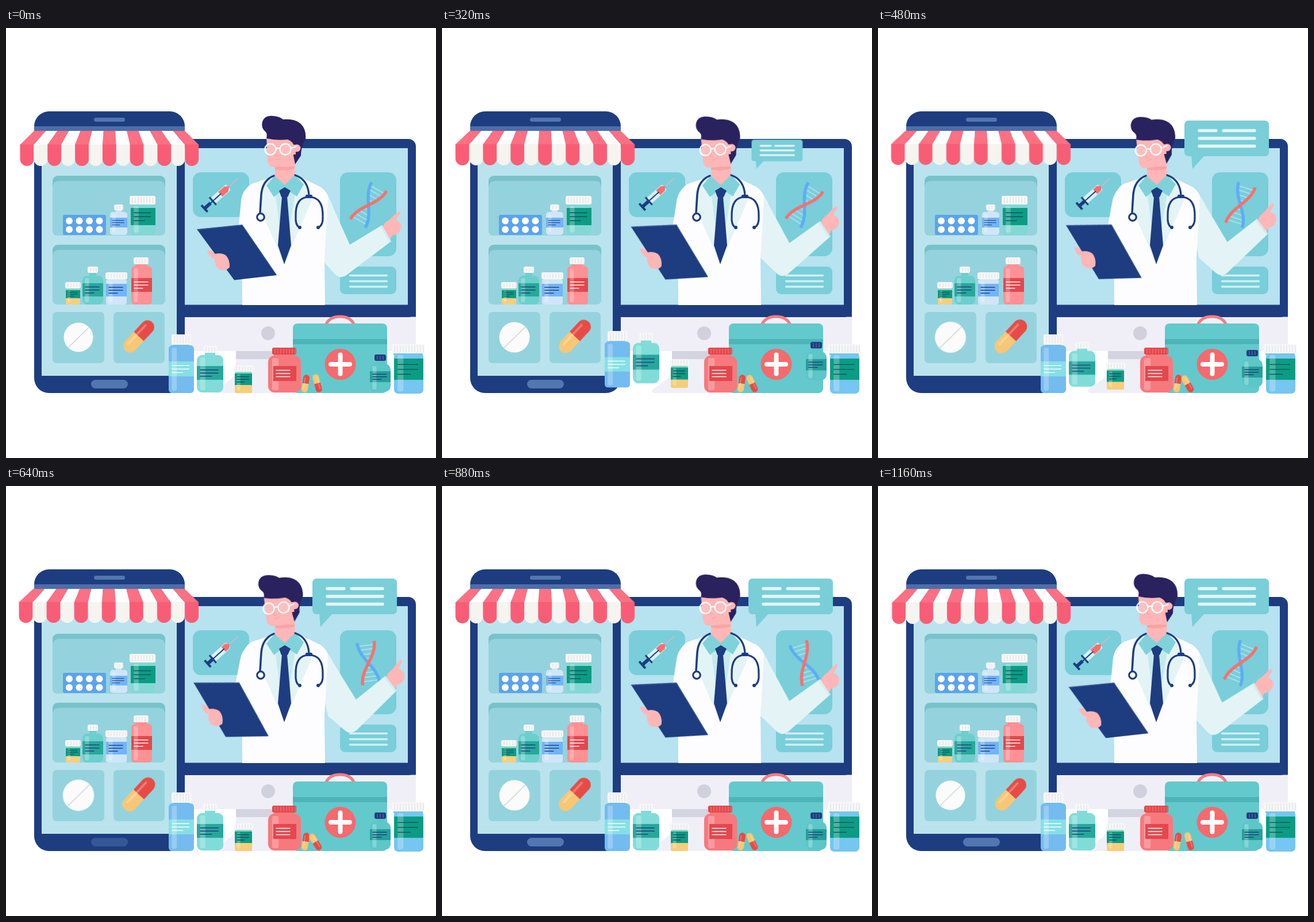
These frames come from a looping animation (748 px wide and 748 px high, 1.2 s). An HTML page:

```html
<!DOCTYPE html>
<html lang="en">
<head>
<meta charset="utf-8">
<title>Online pharmacy</title>
<style>
html,body{margin:0;width:100%;height:100%;overflow:hidden;background:#fff}
svg{display:block;width:100vw;height:100vh}
.sway{animation:sway 1.2s infinite cubic-bezier(.35,.25,.65,.75)}
@keyframes sway{50%{transform:var(--to)}}
.head{--to:rotate(-4.6deg);transform-origin:488px 252px}
.left{--to:rotate(6deg);transform-origin:410px 288px}
.right{--to:rotate(-8deg);transform-origin:562px 292px}
.tablet{--to:scale(1.07);transform-origin:126px 538px}
.capsule{--to:scale(1.06);transform-origin:231px 536px}
.lean{--to:rotate(-18deg);transform-origin:544px 630px}
.awning{--to:translateX(-.2px) scale(1.006,.966);transform-origin:335px 179px}
.plunger{--to:translateX(8px)}
.fluid{--to:scaleX(.62);transform-origin:22px 0}
.bubble{transform-origin:547px 245px;animation:pop 1.2s infinite linear}
@keyframes pop{0%,16.7%{transform:scale(0)}26.67%{transform:scale(.6)}36%,100%{transform:scale(1)}}
.dna{transform-origin:630.5px 308px;animation:rock 1.2s infinite linear}
@keyframes rock{
0%,100%{transform:rotate(30deg)}13%{transform:rotate(31deg)}27%{transform:rotate(32deg)}
40%{transform:rotate(18deg)}53%{transform:rotate(-7deg)}60%{transform:rotate(-16deg)}
67%{transform:rotate(-21deg)}73%{transform:rotate(-18deg)}85%{transform:rotate(3deg)}97%{transform:rotate(23deg)}}
.home{animation:blink 1.2s infinite linear}
@keyframes blink{0%,28%,64%,100%{opacity:1}39%,44%{opacity:0}}
.hop{transform-origin:0 635px;animation:hop 1.2s infinite linear}
@keyframes hop{0%,2%,37%,100%{transform:none}13.33%{transform:var(--up)}26.67%{transform:var(--down)}}
.b1{--up:translateY(-19px) scaleY(1.045);--down:translateY(-9.5px) scaleY(.965)}
.b2{--up:translateY(-16px) scaleY(1.08);--down:translateY(-10px) scaleY(.96);animation-delay:160ms}
.b3{--up:translateY(-9px) scaleY(1.04);--down:translateY(-6px) scaleY(.97);animation-delay:160ms}
.b4{--up:translateY(-20px) scaleY(1.03);--down:translateY(-8px);animation-delay:160ms}
.b5{--up:scaleY(.953);--down:none}
</style>
</head>
<body>
<svg id="stage" viewBox="0 0 748 748"></svg>
<script>
const NAVY = '#1e3c80', SKIN = '#ffb6b6', PANEL = '#79ced9', SHELF = '#94d3dd',
  GREEN = '#0b9c83', WHITE = '#f7f7f8', RED = '#e5474d';

const rect = (x, y, w, h, fill, r = 0) =>
  `<rect x="${x}" y="${y}" width="${w}" height="${h}" rx="${r}" fill="${fill}"/>`;
const circle = (x, y, r, fill, more = '') =>
  `<circle cx="${x}" cy="${y}" r="${r}" fill="${fill}" ${more}/>`;
const path = (d, fill) => `<path d="${d}" fill="${fill}"/>`;
const line = (d, color, w, cap = 'round') =>
  `<path d="${d}" fill="none" stroke="${color}" stroke-width="${w}" stroke-linecap="${cap}" stroke-linejoin="round"/>`;
const group = (cls, ...parts) => `<g class="${cls}">${parts.join('')}</g>`;
const place = (t, ...parts) => `<g transform="${t}">${parts.join('')}</g>`;

// cap: [x, y, w, h, color], label: [y, h, color, text color]
function bottle(x, y, w, h, r, fill, cap, label, foot) {
  const [cx, cy, cw, ch, cc] = cap, [ly, lh, lc, ink] = label;
  let s = rect(cx + 3, cy + ch - 2, cw - 6, y - cy - ch + 6, fill) + rect(x, y, w, h, fill, r);
  if (foot) s += rect(x, ly + lh, w, y + h - ly - lh, foot, 3);
  s += rect(x, ly, w, lh, lc) + rect(x + w * .12, y + 4, w * .2, h - 8, '#ffffff40', 3);
  for (let i = 0; i < 3; i++) {
    const yy = ly + lh * (.28 + i * .23), x0 = x + w * .12;
    s += line(`M${x0} ${yy}H${x0 + w * (i === 2 ? .45 : .7)}`, ink, lh > 17 ? 1.4 : 1, 'butt');
  }
  s += rect(cx, cy, cw, ch, cc, 3);
  const groove = cc === WHITE ? '#dcdde2' : '#ffffff55';
  for (let i = 1; i * 5 < cw; i++) s += line(`M${cx + i * 5} ${cy + 2}v${ch - 4}`, groove, 1, 'butt');
  return s;
}

function pill(x, y, angle, len, w) {
  const h = len / 2, r = w / 2;
  return place(`translate(${x} ${y}) rotate(${angle})`,
    path(`M${-r} 0V${r - h}A${r} ${r} 0 0 1 ${r} ${r - h}V0Z`, '#e84b45'),
    path(`M${-r} 0V${h - r}A${r} ${r} 0 0 0 ${r} ${h - r}V0Z`, '#f8c675'),
    line(`M${-r * .4} ${r - h}V${h - r}`, '#ffffff44', w * .16));
}

function monitor() {
  return path('M400 574H512L514 600L546 628V635H368Q362 632 369 627L390 612Q400 604 400 574Z', '#efeff8') +
    rect(400, 558, 112, 18, '#d4d4e1') +
    rect(298, 490, 415, 72, '#f0eff8', 12) + rect(298, 193, 415, 310, NAVY, 13) +
    rect(298, 490, 415, 12.5, NAVY) + rect(310, 209, 389, 272.5, '#b7e2ef') +
    circle(456, 531, 12, '#d0d1dd') +
    rect(325, 251, 98, 78, PANEL, 14) + rect(581, 251, 98, 146, PANEL, 14) +
    rect(581, 415, 98, 48, PANEL, 9) +
    line('M598.5 430.5H662.5M598.5 440.5H662.5M598.5 450H662.5', '#d0eff4', 3.4);
}

function syringe() {
  return place('translate(372 290) rotate(-42)',
    line('M22 0H42', '#eeb0b5', 1.3), rect(-15, -6.5, 35, 13, '#d8f0f8', 3),
    group('sway fluid', path('M1 -5.5H15L22 0L15 5.5H1Z', '#f56f70')),
    group('sway plunger', line('M-34 0H2', NAVY, 2), rect(-35, -3, 13, 6, NAVY),
      rect(-38, -8, 4, 16, NAVY, 1)),
    rect(-18, -9, 3, 18, NAVY, 1));
}

function dna() {
  let rungs = '';
  for (const [y, w] of [[31, 14], [24, 13], [16, 9], [8, 5]])
    rungs += `M${-w} ${-y}H${w}M${-w} ${y}H${w}`;
  return group('dna', place('translate(630.5 308)',
    line(rungs, '#b9e3f3', 1.7),
    line('M-15 -37C-15 -8 15 8 15 37', '#5dadf3', 5.4, 'butt'),
    line('M15 -37C15 -8 -15 8 -15 37', '#f6706f', 5.4, 'butt')));
}

function doctor() {
  const coat = '#fdfdff', pale = '#e4f4f6';
  const arm = group('sway right',
    path('M655 346Q659 337 666 334Q671 330 677 324L683 319Q687 319 685 324L678 334Q688 338 687 346Q686 359 672 361L667 369Z', SKIN),
    path('M536 276Q558 278 568 310L598 377L654 343L670 371L592 430Q582 437 573 429L546 399Z', pale),
    path('M651 345L654 343L670 371L667 373Z', '#d3ecef'));
  const sleeve = group('sway left',
    path('M432 271Q412 277 409 300L404 352L425 420L450 400L448 285Z', coat));
  const torso = path('M467 258L428 271Q412 278 410 310L411 482H555L554 400L560 292Q554 278 540 273L505 256Z', coat) +
    path('M456 262L446 268Q438 300 441 312L484 410L532 300Q530 275 520 268L508 260Z', pale) +
    path('M465 262L484 410L507 262Z', '#c4eaee');
  const neck = path('M468 238L502 228L503 260L485 277L468 262Z', SKIN) +
    path('M468 241H502V244Q488 250 468 246Z', '#f8a3a4');
  const shirt = path('M467 257L453 274L466 294L485 279L506 293L518 272L503 255L485 273Z', '#80d2da') +
    path('M475 283L485 277L495 283L490 294H479Z', NAVY) +
    path('M480 293H489L496 378L484 411L473 378Z', NAVY);
  const scope = line('M466 257Q446 265 444 290L442 321', NAVY, 3.5) +
    circle(443, 329, 6.3, '#fff', `stroke="${NAVY}" stroke-width="3.2"`) +
    line('M503 256Q526 264 527 292M510 347Q503 342 504 328Q503 294 527 294Q552 294 551 328Q552 342 544 347', NAVY, 3.2) +
    rect(521, 290, 12, 6, NAVY, 2) + circle(511, 347, 3, NAVY) + circle(543, 347, 3, NAVY);
  const lens = 'stroke="#fff" stroke-width="2.3"';
  const head = group('sway head',
    path('M453 187L455 232Q456 242 467 242L495 241Q503 232 504 217L501 186Z', SKIN),
    path('M453 192Q455 185 452 181Q443 174 446 163Q450 151 465 153Q476 154 482 159Q501 157 512 166Q523 176 521 194Q513 207 513 222L503 237L500 222L502 207Q499 197 490 194Q470 196 453 192Z', '#2a215f'),
    circle(506, 209, 6.5, SKIN), rect(499, 203, 5, 17, SKIN),
    line('M470 212L468 223H473M470 229Q474 230 477 227', '#f59da1', 1),
    circle(460, 211, 9.6, '#ffffff20', lens), circle(486, 211, 9.6, '#ffffff20', lens),
    line('M470 210Q473 208 476 210M496 209L505 206', '#fff', 2));
  const board = group('sway left',
    path('M332 350L411 342L471 430L397 438.5Z', NAVY),
    line('M333 351L411 343L470 429', '#3d5d9c', 1.2),
    path('M350 388Q354 384 364 393Q374 390 382 395Q390 403 389 416Q383 424 371 420Q362 413 363 402Q353 399 350 388Z', SKIN));
  return arm + sleeve + torso + neck + shirt + scope + board + head;
}

function shelf(y) {
  return rect(81, y, 196, 104, '#78c3ca', 9) +
    path(`M81 ${y + 20}Q82 ${y + 9} 92 ${y + 9}H266Q276 ${y + 9} 277 ${y + 20}V${y + 95}Q277 ${y + 104} 268 ${y + 104}H90Q81 ${y + 104} 81 ${y + 95}Z`, SHELF);
}

function phone() {
  let s = rect(49, 145, 262, 490, NAVY, 26) + rect(62, 185, 235, 420, '#bae3ee') +
    rect(49, 171, 262, 14, '#4b6faa') + rect(153, 156, 54, 7, '#5277b0', 3.5) +
    group('home', rect(148, 612, 64, 15, '#5277b0', 7.5)) +
    shelf(257) + shelf(377) + rect(81, 494, 90, 89, SHELF, 7) + rect(187, 494, 89, 89, SHELF, 7) +
    rect(99, 325, 75, 35, '#5ba3ee', 3);
  for (let i = 0; i < 8; i++) s += circle(110 + i % 4 * 17.5, i < 4 ? 335.5 : 350.5, 6, '#fff');
  s += bottle(181, 320, 30, 40, 5, '#d0e6f8', [188, 307, 16, 10, WHITE], [330, 17, '#72b4f5', NAVY]) +
    bottle(217, 306, 43, 54, 6, '#83d8d5', [215, 292, 45, 15, WHITE], [313, 30, GREEN, '#0b5266']) +
    bottle(104, 453, 25, 28, 3, '#8fd6c6', [103, 442, 27, 11, WHITE], [456, 14, GREEN, '#164764'], '#f6cf7e') +
    bottle(133, 431, 36, 50, 8, '#6ccfce', [142, 415, 18, 11, WHITE], [444, 23, '#27a89a', NAVY]) +
    bottle(174, 437, 36, 44, 4, '#d0e6f8', [173, 425, 38, 12, WHITE], [445, 22, '#72b4f5', NAVY]) +
    bottle(218, 414, 36, 67, 6, '#ff9094', [222, 399, 26, 12, WHITE], [435, 24, RED, '#fff']);
  s += group('sway tablet', circle(126, 538, 25.5, '#fbfbfb'), line('M108 556L144 521', '#c9d5d6', 1.3));
  return s + group('sway capsule', pill(231, 536.5, 43, 68, 23.5));
}

function awning() {
  let s = '';
  for (let i = 0; i < 13; i++) {
    const x = 24.5 + i * 23.9, e = x + 23.9, a = 49 + i * 20.15, red = i % 2 === 0;
    s += path(`M${a} 179h20.15L${e} 203H${x}Z`, red ? '#fb7083' : '#fff') +
      path(`M${x} 202.5H${e}V228A11.95 12 0 0 1 ${x} 228Z`, red ? '#f95d75' : '#f5f4ef');
  }
  return group('sway awning', s);
}

function bubble() {
  return group('bubble', rect(533, 161, 147, 62, '#79ced8', 7),
    path('M545 221H569L547 245Z', '#79ced8'),
    line('M559 178.5H588M601 178.5H655M559 192H655M559 205.5H655', '#e2f5f7', 5.5));
}

function kit() {
  return line('M556 517Q562 502 581 502Q600 502 606 517', '#f57c80', 5) +
    rect(499, 514, 164, 121, '#63c9cc', 8) + rect(499, 541, 164, 9, '#4db5b7') +
    circle(581.5, 585, 27, '#f6696d') + line('M565 585H598M581.5 568.5V601.5', '#fff', 8);
}

function counter() {
  const hop = (n, ...a) => group('hop b' + n, bottle(...a));
  return kit() +
    bottle(456, 570, 57, 64, 11, '#f6797e', [463, 556, 42, 12, RED], [588, 0, 'none', 'none']) +
    rect(465, 588, 40, 26, RED) +
    line('M470 595.5H494M470 601H494M470 606.5H494', '#fff', 1.5) +
    pill(521, 618.5, 9, 31, 11) +
    group('sway lean', pill(541.5, 618, 165, 32, 11)) +
    hop(1, 283, 552, 44, 83, 6, '#74bbef', [288, 533, 34, 18, WHITE], [580, 26, '#85e0e6', '#fff']) +
    hop(2, 332, 569, 46, 65, 9, '#81dcd9', [343, 553, 24, 12, WHITE], [588, 24, '#27a79b', NAVY]) +
    hop(3, 398, 598, 30, 37, 4, '#8fd6c6', [396, 587, 34, 11, WHITE], [601, 20, GREEN, '#164764'], '#f7cd79') +
    hop(4, 633, 584, 36, 49, 10, '#5cc6c9', [641, 568, 20, 11, NAVY], [597, 19, '#23a098', NAVY]) +
    hop(5, 675, 565, 51, 71, 7, '#75c6f0', [671, 550, 57, 16, WHITE], [575, 37, GREEN, '#0b5266']);
}

document.getElementById('stage').innerHTML =
  monitor() + syringe() + dna() + doctor() + bubble() + phone() + awning() + counter();
</script>
</body>
</html>
```
